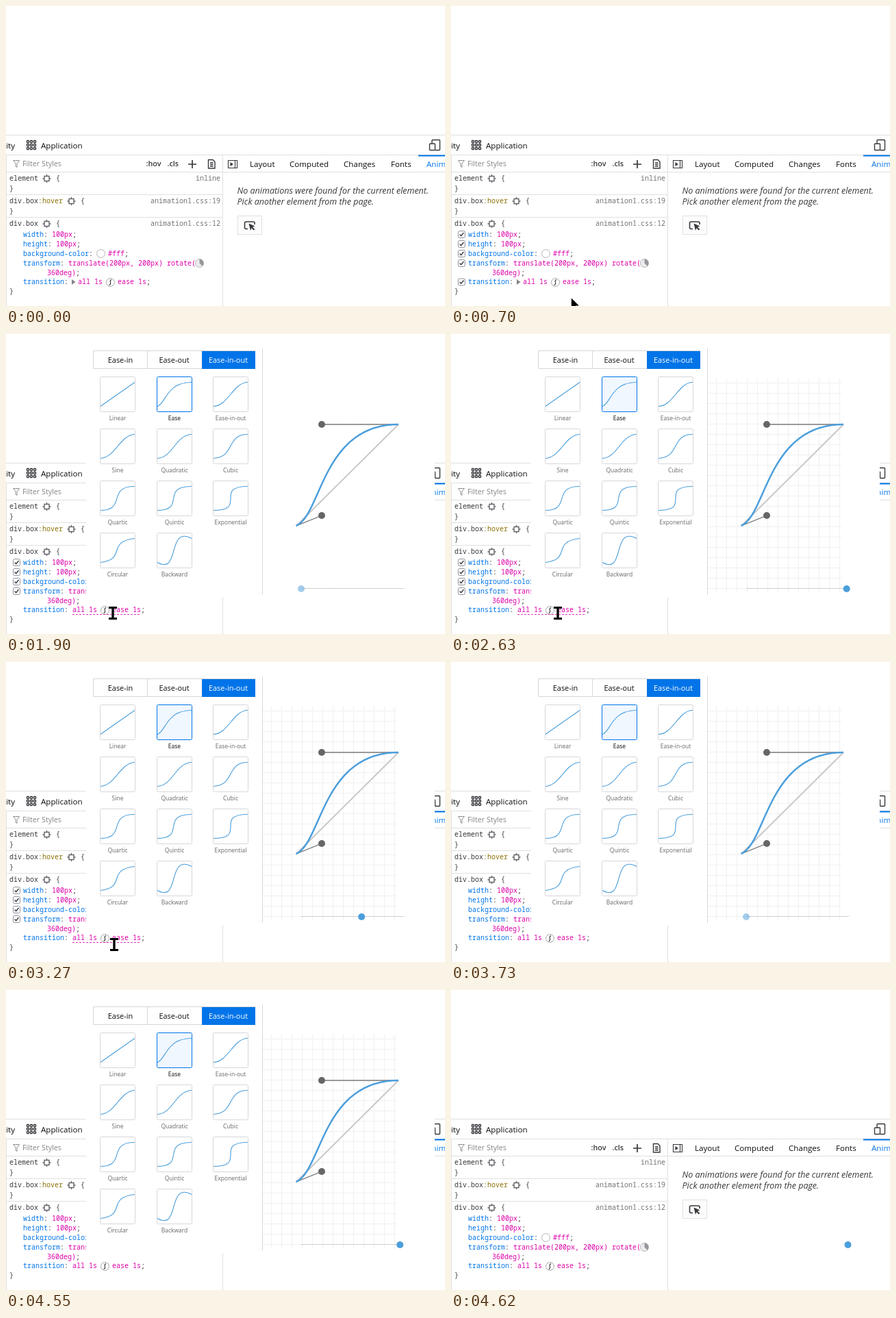
An HTML page that plays this animation: 641x438 px, repeating every 4720 ms.

```html
<!DOCTYPE html>
<html lang="en">
<head>
<meta charset="utf-8">
<title>Easing editor</title>
<style>
  html, body { margin: 0; width: 100%; height: 100%; overflow: hidden; background: #fff; }
  svg { display: block; font: 11.6px "Open Sans", "Noto Sans", sans-serif; fill: #0c0c0d; }
  .mono { font: 10px "Noto Sans Mono", "DejaVu Sans Mono", monospace; fill: #38383d; white-space: pre; }
  .prop { fill: #0074e8; }
  .value { fill: #dd00a9; }
  .pseudo { fill: #8a7000; }
  .source { fill: #737373; }
  .small { font-size: 8.5px; fill: #66666b; text-anchor: middle; }
  .tab { font-size: 10.9px; text-anchor: middle; }
  .rule { stroke: #e0e0e2; fill: none; }
  .icon { stroke: #38383d; fill: none; stroke-width: 1.4; }
  .curve { stroke: #4a9edb; fill: none; }
</style>
</head>
<body>
<svg id="stage" width="641" height="438" viewBox="0 0 641 438"></svg>
<script>
const LOOP = 4720;
const EASE = [0.25, 0.1, 0.25, 1];
const PRESETS = [
  ["Linear", 0, 0, 1, 1], ["Ease", ...EASE], ["Ease-in-out", .42, 0, .58, 1],
  ["Sine", .445, .05, .55, .95], ["Quadratic", .455, .03, .515, .955], ["Cubic", .645, .045, .355, 1],
  ["Quartic", .77, 0, .175, 1], ["Quintic", .86, 0, .07, 1], ["Exponential", 1, 0, 0, 1],
  ["Circular", .785, .135, .15, .86], ["Backward", .68, -.55, .265, 1.55]
];
// The screen refreshes in bursts: first time, last time, number of refreshes.
const BURSTS = [[560, 1060, 7], [1150, 1240, 2], [1900, 1900, 1], [2180, 2810, 8],
  [3180, 3730, 7], [4100, 4550, 6], [4620, 4620, 1]];
const moments = [0, ...BURSTS.flatMap(([a, b, n]) =>
  Array.from({ length: n }, (_, i) => n > 1 ? Math.floor(a + (b - a) * i / (n - 1)) : a))];

const range = (n, fn) => Array.from({ length: n }, (_, i) => fn(i)).join("");
const text = (x, y, s, cls = "", extra = "") => `<text x="${x}" y="${y}" class="${cls}" ${extra}>${s}</text>`;
const mono = (x, y, s, cls = "") => text(x, y, s, "mono " + cls);
const span = (cls, s) => `<tspan class="${cls}">${s}</tspan>`;
const path = (d, cls, extra = "") => `<path d="${d}" class="${cls}" ${extra}/>`;
const declaration = (y, name, value) => mono(25, y, span("prop", name) + ": " + value);
const simple = (y, name, value) => declaration(y, name, span("value", value) + ";");

function bezierPath([x1, y1, x2, y2], x, y, w, h) {
  const p = (u, v) => `${x + u * w} ${y - v * h}`;
  return `M${p(0, 0)}C${p(x1, y1)} ${p(x2, y2)} ${p(1, 1)}`;
}

function target(x, y) {
  return `<g transform="translate(${x} ${y})">` +
    path("M-3.5-3.5h7v7h-7zM0-6v2.5M0 3.5v2.5M-6 0h2.5M3.5 0h2.5", "icon", 'style="stroke:#66666b"') + "</g>";
}

function toolbar() {
  const dots = range(9, i =>
    `<rect x="${30.5 + i % 3 * 5}" y="${196.5 + Math.floor(i / 3) * 5}" width="3" height="3" rx=".7" class="icon" stroke-width="1"/>`);
  return path("M0 188.5H641M0 217.5H641M0 242.5H641M316.5 218V438M.5 218V438M0 275.5H316M0 308.5H316", "rule") +
    text(13, 208, "ity", "", 'text-anchor="end"') + `<g style="stroke-width:1">${dots}</g>` +
    text(51, 208, "Application") +
    path("M622 201V196.5Q622 195.5 623 195.5H632.5Q633.5 195.5 633.5 196.5V209.5Q633.5 210.5 632.5 210.5H627M619.5 201H625.5Q626.5 201 626.5 202V209.5Q626.5 210.5 625.5 210.5H619.5Q618.5 210.5 618.5 209.5V202Q618.5 201 619.5 201Z", "icon") +
    path("M10.5 225.5H19.5L16 230V235.5L14 234V230Z", "icon", 'style="stroke:#8f8f94;stroke-width:1"') +
    text(24, 234, "Filter Styles", "", 'style="font-size:10.75px;fill:#85858a"') +
    `<g font-weight="600" font-size="10.8" fill="#38383d">${text(204.5, 234, ":hov") + text(235.5, 234, ".cls")}</g>` +
    path("M266 231H278M272 225V237", "icon", 'style="stroke-width:1.7"') +
    path("M295.5 224.5H302L305 227.5V237H295.5ZM298 229H302.5M298 231.5H302.5M298 234H302.5", "icon") +
    path("M324.5 225.5H337.5V236.5H324.5ZM334.5 226V236", "icon", 'style="stroke-width:1.1"') +
    '<path d="M327.5 228V234L332 231Z" fill="#38383d"/>' +
    text(356, 235, "Layout") + text(414, 235, "Computed") + text(493, 235, "Changes") + text(562, 235, "Fonts") +
    text(614, 235, "Animations", "prop") +
    '<rect x="602" y="217.5" width="39" height="2" fill="#0074e8"/>';
}

function animationPanel() {
  const note = 'style="font-size:12.5px;font-style:italic;fill:#38383d"';
  return text(337.5, 274, "No animations were found for the current element.", "", note) +
    text(337.5, 290, "Pick another element from the page.", "", note) +
    '<rect x="338.5" y="306.5" width="35" height="27" fill="#fcfcfd" class="rule" style="fill:#fcfcfd"/>' +
    path("M353 325.5H350.5Q348.5 325.5 348.5 323.5V317Q348.5 315 350.5 315H361Q363 315 363 317V319", "icon", 'style="stroke-width:1.6"') +
    '<path d="M354.5 317.5L363.5 321.5L360 322.7L363.3 326L361.7 327.6L358.5 324.3L357 328Z" fill="#38383d"/>';
}

function checkbox(y, id = "") {
  return `<g ${id} transform="translate(15.5 ${y})"><rect x="-5" y="-5" width="10" height="10" rx="2" fill="#fff" stroke="#8f8f9d"/>` +
    path("M-2.8 0L-.8 2.2L3-2.5", "icon") + "</g>";
}

function rules() {
  return mono(5, 255, "element") + target(59.5, 252) + mono(73, 255, "{") + mono(277, 255, "inline", "source") + mono(5, 270, "}") +
    mono(5, 288, "div.box" + span("pseudo", ":hover")) + target(95.5, 285) + mono(109, 288, "{") +
    mono(211, 288, "animation1.css:19", "source") + mono(5, 303, "}") +
    mono(5, 321, "div.box") + target(59.5, 318) + mono(73, 321, "{") + mono(211, 321, "animation1.css:12", "source") +
    simple(337, "width", "100px") + simple(351, "height", "100px") +
    declaration(365, "background-color", "") +
    '<circle cx="138.5" cy="361.5" r="6" fill="#fff" stroke="#b5b5b9"/>' + mono(149, 365, span("value", "#fff") + ";") +
    declaration(379, "transform", span("value", "translate(200px, 200px) rotate(")) +
    '<circle cx="282.5" cy="375.5" r="6" fill="#ededf0" stroke="#b5b5b9"/><path d="M282.5 375.5V369.5A6 6 0 0 1 286.7 379.7Z" fill="#96969b"/>' +
    mono(60, 393, span("value", "360deg)") + ";") +
    declaration(406, "transition", "") +
    '<path id="expander" d="M96 399V407L101.5 403Z" fill="#85858a"/>' +
    '<g id="transition">' + mono(105, 406, "all 1s", "value") + mono(163, 406, span("value", "ease 1s") + ";") +
    '<circle cx="152.5" cy="403.5" r="6" fill="#fff" stroke="#a5a5aa"/>' +
    path("M150.5 407.5C156 406 149 401 154 399.5", "icon", 'style="stroke-width:1.1"') +
    path("M105 409.5H205", "", 'id="underline" stroke="#dd00a9" stroke-dasharray="3 2" opacity=".8"') + "</g>" +
    mono(5, 420, "}") +
    `<g id="checks">${[333.5, 347.5, 361.5, 375.5].map(y => checkbox(y)).join("")}</g>` + checkbox(403, 'id="lastCheck"');
}

function preset([name, ...curve], i) {
  const x = [137.5, 220.5, 302.5][i % 3], y = 62.5 + Math.floor(i / 3) * 76, on = name === "Ease";
  return `<rect ${on ? 'id="chosen"' : ""} x="${x}" y="${y}" width="51" height="51" rx="2" fill="#fff" stroke="${on ? "#0074e8" : "#d7d7db"}"/>` +
    path(bezierPath(curve, x + .5, y + 43, 50, 35), "curve", 'stroke-width="1.1"') +
    text(x + 25.5, y + 63.5, name, "small", on ? 'style="fill:#0c0c0d"' : "");
}

function popup() {
  const dots = range(16 * 23, i =>
    `M${387 + i % 16 * 15} ${41 + Math.floor(i / 16) * 15}h1`);
  const grid = range(13, i => `M${387.5 + i * 15} 65V378`) + range(21, i => `M375 ${71.5 + i * 15}H570`);
  return '<rect x="117" y="21" width="509" height="364" fill="#fff"/>' +
    path("M127.5 24.5H363.5V50.5H127.5ZM206.5 25V50M374.5 21V381", "", 'fill="none" stroke="#d7d7db"') +
    '<rect x="286" y="25" width="78" height="26" fill="#0074e8"/>' +
    text(167, 42, "Ease-in", "tab") + text(245.5, 42, "Ease-out", "tab") +
    text(324.5, 42, "Ease-in-out", "tab", 'style="fill:#fff"') +
    PRESETS.map(preset).join("") +
    path(dots, "", 'stroke="#ececec"') + path(grid, "", 'id="grid" stroke="#f0f0f0"') +
    path("M424 280L573 132", "", 'stroke="#c8c8c8" stroke-width="2"') +
    path("M424 280L461 265", "", 'stroke="#666" stroke-width="1.2"') +
    path("M461 132H573", "", 'stroke="#999" stroke-width="1.8"') +
    path(bezierPath(EASE, 423.5, 280, 149.5, 148), "curve", 'stroke-width="2.5"') +
    '<circle cx="461" cy="132" r="5" fill="#666"/><circle cx="461" cy="265" r="5" fill="#666"/>' +
    path("M431 371.5H581", "", 'stroke="#cfcfcf"');
}

const POINTERS = {
  arrow: "M0 0V15L3.6 11.8L6 17.5L8.8 16.3L6.4 10.8H11Z",
  hand: "M-2.2 1.5Q0-1.5 2.2 1.5V8Q4 6.7 5.5 8Q7.8 7.4 8.5 9Q11 9 11 11.5V15Q10.5 18 8.5 19V21.5H-2V19Q-4 17-7 12.5Q-6.5 9.5-4 11L-2.2 12.5Z",
  beam: "M-6-9H6V-6H1.7V7H6V10H-6V7H-1.7V-6H-6Z"
};

const stage = document.getElementById("stage");
stage.innerHTML = toolbar() + animationPanel() + rules() + `<g id="popup">${popup()}</g>` +
  '<circle id="ball" cy="372" r="5" fill="#4a9edb"/>' +
  '<path id="pointer" fill="#000" stroke="#fff" stroke-width=".8" paint-order="stroke"/>';
const part = id => stage.querySelector("#" + id);
const show = (id, on) => part(id).setAttribute("display", on ? "inline" : "none");
const clamp = v => Math.min(1, Math.max(0, v));
const mix = (a, b, k) => a + (b - a) * k;

function ease(x) {
  if (x <= 0 || x >= 1) return clamp(x);
  const [x1, y1, x2, y2] = EASE;
  const at = (a, b, s) => 3 * a * s * (1 - s) ** 2 + 3 * b * s * s * (1 - s) + s ** 3;
  let low = 0, high = 1;
  for (let i = 0; i < 24; i++) {
    const mid = (low + high) / 2;
    if (at(x1, x2, mid) < x) low = mid; else high = mid;
  }
  return at(y1, y2, low);
}

// Each run of the preview ball takes 600 ms, with a dimmed rest between runs.
function ballState(t) {
  const [start, from, to] = t >= 4098 ? [4098, 431, 581] : t >= 3120 ? [3120, 581, 431] : [2145, 431, 581];
  const k = (t - start) / 600;
  return { x: mix(from, to, ease(k)), opacity: k < 0 || k >= 1 ? .5 : 1 };
}

function pointerState(t) {
  if (t < 560 || t >= 3730) return null;
  if (t < 1900) {
    const k = 1 - (1 - clamp((t - 560) / 680)) ** 2;
    return { kind: t < 970 ? "arrow" : "hand", x: mix(182, 155, k), y: mix(433, 405, k) };
  }
  const k = clamp((t - 3180) / 460);
  return { kind: k > .5 ? "arrow" : "beam", x: mix(156, 166, k), y: mix(407, 432, k) };
}

function draw(time) {
  const t = moments.findLast(m => m <= time);
  const edited = t >= 1900, open = edited && t < 4620;
  const pointer = pointerState(t), ball = ballState(t);
  const over = pointer && (edited || pointer.y < 427);

  show("popup", open);
  show("grid", t >= 2180);
  part("chosen").setAttribute("fill", t >= 2180 ? "#f0f7ff" : "#fff");
  show("ball", edited);
  part("ball").setAttribute("cx", ball.x);
  part("ball").setAttribute("opacity", ball.opacity);

  show("expander", !edited);
  part("transition").setAttribute("transform", `translate(${edited ? -8 : 0} 0)`);
  show("underline", over && pointer.y < 414);
  show("checks", over);
  show("lastCheck", over && !edited);

  show("pointer", pointer);
  if (pointer) {
    part("pointer").setAttribute("d", POINTERS[pointer.kind]);
    part("pointer").setAttribute("transform", `translate(${pointer.x} ${pointer.y})`);
  }
}

const began = performance.now();
function tick() {
  draw((performance.now() - began) % LOOP);
  requestAnimationFrame(tick);
}
tick();
</script>
</body>
</html>
```
